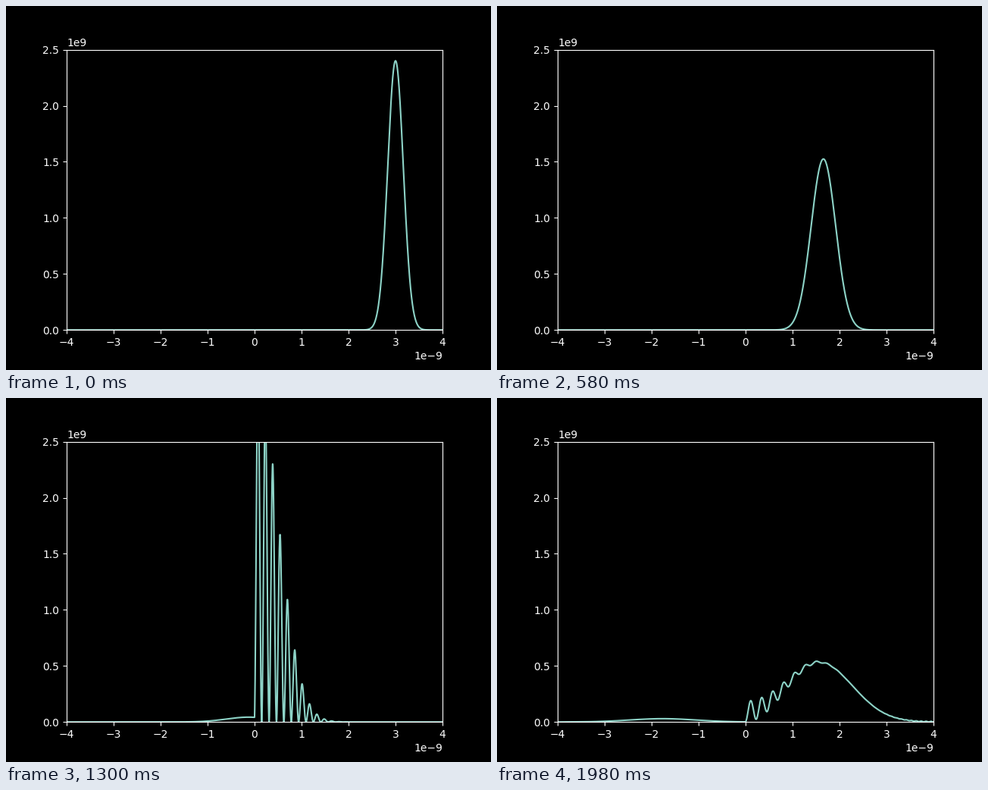
A matplotlib script that plays this animation: 640 px wide and 480 px high, repeating every 2000 ms.

```python
import numpy as np
import matplotlib.pyplot as plt
from matplotlib.animation import FuncAnimation

HBAR, MASS = 1.054572e-34, 9.10938e-31
L = 4e-9             # half width of the box
G = 8.7e10           # strength of the delta barrier at x = 0, in 1/m
X0, K0, S = 3e-9, -2e10, 0.235e-9
DT, FRAMES = 2e-17, 100
MODES = 90

x = np.linspace(-L, L, 2001)
dx = x[1] - x[0]
n = np.arange(1, MODES + 1)

# Odd states do not feel the barrier.
k_odd = n * np.pi / L
odd = np.sin(np.outer(k_odd, x)) / np.sqrt(L)

# Even states: k cos(kL) + G sin(kL) = 0, solved by bisection.
lo, hi = (n - 0.5) * np.pi / L, n * np.pi / L
for _ in range(60):
    mid = (lo + hi) / 2
    f = mid * np.cos(mid * L) + G * np.sin(mid * L)
    same = np.sign(f) == np.sign(np.sin(lo * L))
    lo, hi = np.where(same, mid, lo), np.where(same, hi, mid)
k_even = (lo + hi) / 2
norm = np.sqrt(L - np.sin(2 * k_even * L) / (2 * k_even))
even = np.sin(np.outer(k_even, L - np.abs(x))) / norm[:, None]

k = np.concatenate([k_odd, k_even])
states = np.vstack([odd, even])
packet = np.exp(-((x - X0) / S) ** 2 / 2 + 1j * K0 * x)
packet /= np.sqrt(np.sum(np.abs(packet) ** 2) * dx)
coef = states @ packet * dx
omega = HBAR * k ** 2 / (2 * MASS)


def density(i):
    return np.abs((coef * np.exp(-1j * omega * i * DT)) @ states) ** 2


plt.style.use("dark_background")
fig, ax = plt.subplots(figsize=(6.4, 4.8), dpi=100)
ax.set_xlim(-L, L)
ax.set_ylim(0, 2.5e9)
line, = ax.plot(x, density(0))


def update(i):
    line.set_ydata(density(i))
    return line,


anim = FuncAnimation(fig, update, frames=FRAMES, interval=20,
                     repeat=True, repeat_delay=0)
plt.show()
```
